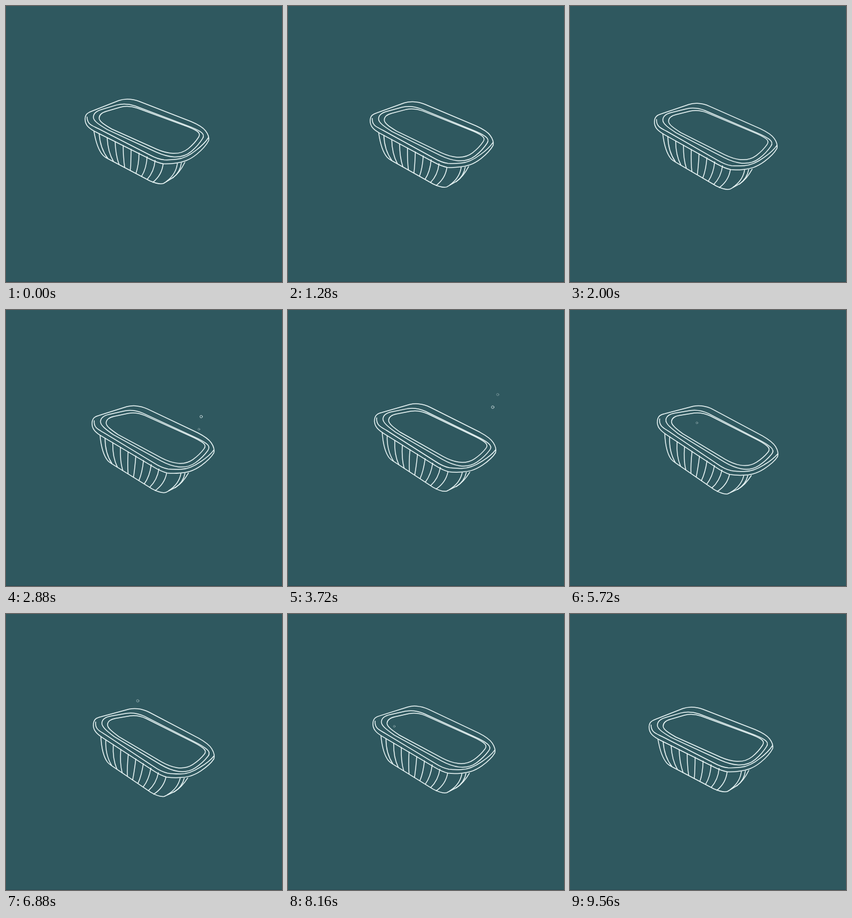
Recreate the animation shown at these times as an HTML page. Size 480 by 480 pixels, loop 9640 ms.

```html
<!DOCTYPE html>
<html lang="en">
<head>
<meta charset="utf-8">
<title>Floating tray</title>
<style>
  html, body { margin: 0; height: 100%; overflow: hidden; background: #2f585f; }
  svg { display: block; width: 100vw; height: 100vh; }
  path, circle { fill: none; stroke: #e9f5f5; stroke-linecap: round; stroke-linejoin: round; }
  path { stroke-width: 1.5; }
  circle { stroke-width: .8; }
</style>
</head>
<body>
<svg viewBox="0 0 480 480">
  <defs>
    <path id="opening" vector-effect="non-scaling-stroke" d="M162 195C162 189 168 185 175 183L199 176Q213 172.5 228 177.5L311 208Q325 213 332 217.5Q339 222 335 228Q328 239 317 248Q306 257 290 256.3Q277 255.5 262 249L184 214C172 207 162 201 162 195Z"/>
  </defs>
  <g id="tray">
    <!-- lid: silhouette, front rim, two nested rings -->
    <path d="M137.5 196C138 188 142 185.5 149 183L196 164.5Q203 162 211 162Q222 162 232 166L322 201Q341 209 347 217Q354 226 352.5 234Q347 245 332 257.5C318 269 307 271.5 297 273Q284 275 274 274.5Q264 273 250 266L158 220C146 214 137 208 137.5 196Z"/>
    <path d="M141 193C141 206 150 208 160 213L250 259Q264 266.5 275 267.5Q284 268 297 266.5Q313 265 331 250.5Q346 239 352 229"/>
    <use href="#opening"/>
    <use href="#opening" transform="translate(248 216) scale(1.097 1.125) translate(-249.5 -215)"/>
    <!-- body -->
    <path d="M153 218Q158 248 169 260Q172 263 178 266L250 304Q266 311 274 308.5L291 298Q302 290 311 272"/>
    <path id="ribs"/>
  </g>
  <g id="bubbles"></g>
  <path d="M0 479.5H480" style="stroke:#2a4c54;stroke-width:1"/>
</svg>
<script>
const LOOP = 9640, TRIP = 9560;
const tray = document.getElementById('tray');
const group = document.getElementById('bubbles');

// A rib leaves the rim steeply and leans towards the base
const rib = (x, y, u, v) =>
  `M${x} ${y}Q${x + (u - x) * .12} ${y + (v - y) * .6} ${u} ${v}`;

let ribs = '';
for (let i = 0; i < 9; i++) {
  ribs += rib(162 + 13.9 * i, 222 + 7 * i - .05 * i * i, 177 + 9.8 * i, 265 + 5.2 * i);
}
for (let i = 0; i < 2; i++) ribs += rib(298 + 7 * i, 274 - i, 279 + 11 * i, 305 - 6 * i);
document.getElementById('ribs').setAttribute('d', ribs);

// Drift: time, centre x, centre y, tilt in degrees
const drift = [
  [0, 249.5, 208.5, 0], [1280, 254.5, 214, 1.6], [2080, 258.5, 217.7, 2.7],
  [2880, 260.5, 215.8, 4.1], [4760, 261, 211.5, 6.7], [6040, 262, 219, 6.8],
  [6880, 262, 215.2, 6.4], [8160, 258.6, 209.3, 4]
];

function key(i) {
  const n = drift.length, turn = Math.floor(i / n);
  const [t, ...pose] = drift[i - turn * n];
  return [t + turn * TRIP, ...pose];
}

// Smooth periodic curve through the drift points
function poseAt(t) {
  let i = drift.length - 1;
  while (drift[i][0] > t) i--;
  const [a, b, c, d] = [i - 1, i, i + 1, i + 2].map(key);
  const span = c[0] - b[0], s = (t - b[0]) / span;
  return [1, 2, 3].map(k => {
    const m = (c[k] - a[k]) / (c[0] - a[0]) * span;
    const n = (d[k] - b[k]) / (d[0] - b[0]) * span;
    const e = s * s * (3 - 2 * s);
    return b[k] + (c[k] - b[k]) * e + s * (1 - s) * (m * (1 - s) - n * s);
  });
}

// Bubbles all rise to the same height before they fade
const CEILING = 130;
const bubbles = [
  { start: 2300, life: 1795, x: 322, y: 212, sway: 54 },
  { start: 2780, life: 1795, x: 333, y: 212, sway: 44 },
  { start: 5625, life: 1795, x: 220, y: 200, sway: 13 },
  { start: 8080, life: 1240, x: 184, y: 200, sway: 13 }
];
for (const b of bubbles) {
  b.dot = group.appendChild(document.createElementNS('http://www.w3.org/2000/svg', 'circle'));
}

function set(el, attrs) {
  for (const name in attrs) el.setAttribute(name, attrs[name]);
}

function draw() {
  const t = performance.now() % LOOP;
  const [x, y, tilt] = poseAt(Math.min(t, TRIP));
  set(tray, { transform: `translate(${x} ${y}) rotate(${tilt}) translate(-249.5 -208.5)` });
  for (const b of bubbles) {
    const p = (t - b.start) / b.life;
    set(b.dot, {
      cx: b.x + b.sway * p,
      cy: b.y + (CEILING - b.y) * p,
      r: 1.5 + .8 * Math.sin(Math.PI * Math.min(1, Math.max(0, p))),
      opacity: p > 0 && p < 1 ? Math.min(1, .35 + 2 * p, 2 * (1 - p)) : 0
    });
  }
  requestAnimationFrame(draw);
}
draw();
</script>
</body>
</html>
```
